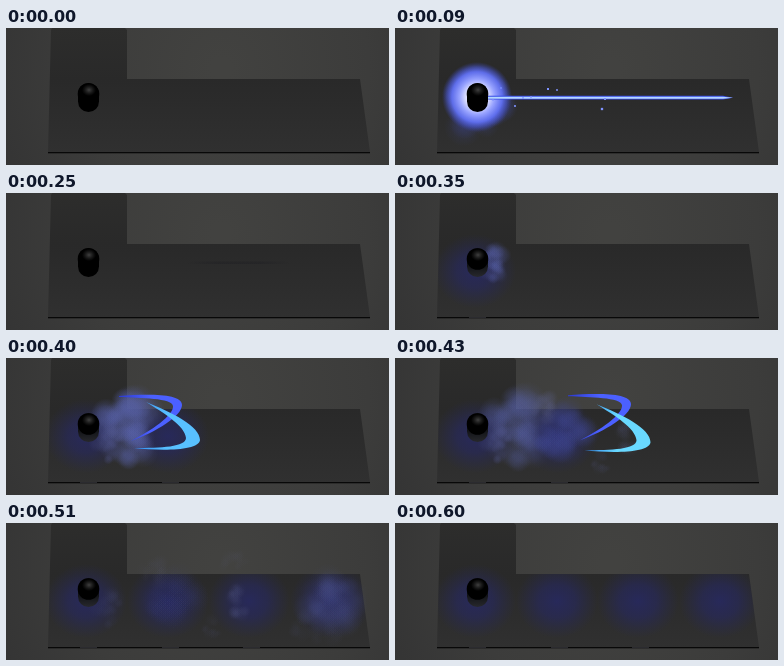
Animation, 383 px wide and 137 px high, one loop 680 ms. Source, as an HTML page with a canvas:

```html
<!DOCTYPE html>
<html lang="en">
<head>
<meta charset="utf-8">
<title>Beam and crescent attack</title>
<style>
html, body { margin: 0; width: 100%; height: 100%; overflow: hidden; background: #3c3c3b; }
canvas { display: block; width: 383px; height: 137px; }
</style>
</head>
<body>
<canvas id="stage" width="383" height="137"></canvas>
<script>
const ctx = document.getElementById('stage').getContext('2d');
const LOOP = 680;
// The picture holds between these times.
const STEPS = [0, 40, 90, 130, 160, 210, 250, 350, 400, 430, 460, 510, 550, 600];
const LIGHTS = [[80, 350], [162, 400], [243, 510], [325, 510]];
const floorShape = new Path2D('M45 2L46 0H119L121 2V51H354L364 124H42Z');
const frontCrescent = new Path2D('M140 44C165 54 194 68 194 82C193 93 155 93 128 90C155 90 180 89 180 80C179 68 158 55 140 44Z');
const backCrescent = new Path2D('M113 38C140 36 176 35 176 47C176 58 150 74 125 83C145 73 168 57 167 48C166 40 135 40 113 39Z');

// Linear interpolation through [time, value] pairs, zero outside them.
function key(t, ...pairs) {
  for (let i = 0; i < pairs.length; i++) {
    const [time, value] = pairs[i];
    if (t === time) return value;
    if (t < time) {
      if (!i) return 0;
      const [t0, v0] = pairs[i - 1];
      return v0 + (value - v0) * (t - t0) / (time - t0);
    }
  }
  return 0;
}

function random(seed) {
  return () => {
    seed = (seed * 16807) % 2147483647;
    return seed / 2147483647;
  };
}

function fade(gradient, stops) {
  stops.forEach(([at, color]) => gradient.addColorStop(at, color));
  return gradient;
}

function blob(x, y, rx, ry, stops) {
  ctx.save();
  ctx.translate(x, y);
  ctx.scale(1, ry / rx);
  ctx.fillStyle = fade(ctx.createRadialGradient(0, 0, 0, 0, 0, rx), stops);
  ctx.fillRect(-rx, -rx, rx * 2, rx * 2);
  ctx.restore();
}

function smoke(x, y, rx, ry, alpha, rgb, seed, count = 22) {
  if (alpha <= 0) return;
  const rnd = random(seed * 7919);
  rnd();
  for (let i = 0; i < count; i++) {
    const angle = rnd() * Math.PI * 2;
    const dist = Math.sqrt(rnd()) * 0.72;
    const size = Math.min(rx, ry) * (0.24 + rnd() * 0.3);
    const a = alpha * (0.5 + rnd() * 0.7);
    blob(x + Math.cos(angle) * rx * dist, y + Math.sin(angle) * ry * dist, size, size, [
      [0, `rgba(${rgb},${a})`],
      [0.5, `rgba(${rgb},${a * 0.65})`],
      [1, `rgba(${rgb},0)`]
    ]);
  }
}

function scene() {
  ctx.fillStyle = fade(ctx.createRadialGradient(215, 40, 10, 215, 40, 240), [
    [0, '#424240'], [0.6, '#3c3c3b'], [1, '#343434']
  ]);
  ctx.fillRect(0, 0, 383, 137);
  ctx.fillStyle = fade(ctx.createLinearGradient(0, 0, 0, 124), [
    [0, '#2d2d2c'], [0.42, '#292929'], [1, '#303030']
  ]);
  ctx.fill(floorShape);
  ctx.fillStyle = '#080808';
  ctx.fillRect(42, 124, 322, 1.3);
}

function floorLights(t) {
  ctx.save();
  ctx.clip(floorShape);
  for (const [x, start] of LIGHTS) {
    if (t < start) continue;
    blob(x, 78, 41, 37, [
      [0, 'rgba(38,40,108,.72)'], [0.45, 'rgba(38,40,102,.55)'], [1, 'rgba(38,40,90,0)']
    ]);
  }
  ctx.restore();
  ctx.fillStyle = '#2b2b2f';
  for (const [x, start] of LIGHTS.slice(0, 3)) {
    if (t >= start) ctx.fillRect(x - 6, 124, 17, 1);
  }
}

function capsule(lit) {
  if (lit) {
    ctx.fillStyle = fade(ctx.createLinearGradient(0, 72, 0, 85), [[0, '#111216'], [1, '#292a2e']]);
  } else {
    ctx.fillStyle = '#000';
  }
  ctx.beginPath();
  ctx.roundRect(72, 55, 21, 29, 10.5);
  ctx.fill();
  ctx.fillStyle = '#000';
  ctx.beginPath();
  ctx.arc(82.5, 66, 10.8, 0, Math.PI * 2);
  ctx.fill();
  blob(83, 62, 7, 6, [[0, 'rgba(85,85,85,.75)'], [1, 'rgba(60,60,60,0)']]);
}

function streak(x, width, height, alpha, edge, core) {
  const shape = (w, h, color) => {
    ctx.fillStyle = color;
    ctx.beginPath();
    ctx.ellipse(x, 69.7, w / 2, h / 2, 0, 0, Math.PI * 2);
    ctx.fill();
  };
  ctx.globalAlpha = alpha;
  shape(width, height, edge);
  shape(width * 0.8, height * 0.45, core);
  ctx.globalAlpha = 1;
}

function beam(t) {
  const trail = key(t, [130, 0.3], [160, 0.5], [210, 0.35], [250, 0.14]);
  if (trail) {
    const inset = Math.max(0, t - 160) * 0.55;
    ctx.fillStyle = fade(ctx.createLinearGradient(130 + inset, 0, 335 - inset, 0), [
      [0, 'rgba(5,5,18,0)'], [0.3, `rgba(5,5,18,${trail})`],
      [0.7, `rgba(5,5,18,${trail})`], [1, 'rgba(5,5,18,0)']
    ]);
    ctx.fillRect(130, 68.5, 206, 2.5);
  }
  const solid = key(t, [40, 1], [90, 1], [130, 0.65]);
  if (solid) {
    const half = key(t, [40, 2.4], [90, 1.9], [130, 1.2]);
    const taper = (h, color) => {
      ctx.fillStyle = color;
      ctx.beginPath();
      ctx.moveTo(88, 69.7 - h);
      ctx.lineTo(328, 69.7 - h);
      ctx.lineTo(338, 69.7);
      ctx.lineTo(328, 69.7 + h);
      ctx.lineTo(88, 69.7 + h);
      ctx.fill();
    };
    ctx.globalAlpha = solid;
    taper(half, '#3549e8');
    taper(half * 0.5, '#b4d6ff');
    ctx.globalAlpha = 1;
  }
  const broken = key(t, [130, 0.5], [160, 1], [210, 0.2]);
  if (broken) {
    const shrink = t > 160 ? 0.6 : 1;
    for (const [x, w] of [[150, 17], [187, 36], [241, 31], [284, 25], [320, 29]]) {
      streak(x, w * shrink, 3.4 * shrink, broken, '#3348e0', '#8ba6ff');
    }
  }
}

function sparks(t) {
  const alpha = key(t, [40, 1], [90, 1], [160, 0.85], [210, 0.3]);
  if (!alpha) return;
  const u = (t - 90) / 70;
  const list = [
    [106, 60, 10, 6, 1.5], [98, 72, 0, 1, 1.5], [120, 78, 1, 0, 1.8], [128, 70, 5, 0, 1.6],
    [136, 69, 1, 0, 1.6], [153, 61, 9, 0, 2], [162, 62, 0, 0, 1.7],
    [210, 71, 16, 1, 2], [207, 81, 24, 1, 2.3]
  ];
  ctx.globalAlpha = alpha;
  ctx.fillStyle = t < 130 ? '#7f93ff' : '#5468e6';
  for (const [x, y, dx, dy, size] of list) {
    ctx.fillRect(x + dx * u - size / 2, y + dy * u - size / 2, size, size);
  }
  ctx.globalAlpha = 1;
}

function blast(t) {
  const spread = key(t, [40, 30], [90, 40], [160, 42], [210, 44]);
  const dense = key(t, [40, 0.25], [90, 0.32], [160, 0.4], [210, 0.12]);
  smoke(79, 76 + t / 60, spread, spread * 0.93, dense, t < 130 ? '62,72,160' : '84,96,176', 5, 32);
  const glow = key(t, [40, 1], [90, 1], [130, 0.5], [160, 0.06]);
  if (!glow) return;
  ctx.globalAlpha = glow;
  blob(82, 69, 35, 35, [
    [0, '#e8e9ff'], [0.32, '#dcdeff'], [0.5, '#98a3ff'], [0.72, 'rgba(98,114,246,.92)'],
    [0.86, 'rgba(76,90,215,.55)'], [1, 'rgba(60,70,180,0)']
  ]);
  ctx.globalAlpha = 1;
}

function trailSmoke(t) {
  const near = key(t, [350, 0.25], [400, 0.42], [430, 0.25], [460, 0.1], [510, 0.03]);
  const wide = key(t, [350, 18], [400, 36], [460, 40], [510, 42]);
  smoke(key(t, [350, 98], [400, 122], [510, 124]), 70, wide, wide * 1.2,
    t <= 430 ? near : 0, '88,98,172', 11, 32);
  smoke(102, 86, 17, 24, key(t, [400, 0.3], [430, 0.28], [460, 0.22], [510, 0.08]), '82,88,145', 3, 14);
  smoke(165, 72, 35, 34, key(t, [430, 0.28], [460, 0.13], [510, 0.05]), '64,72,150', 17, 24);
  smoke(150, 49, 18, 18, key(t, [430, 0.2], [460, 0.16], [510, 0.05]), '92,96,140', 8, 12);
  smoke(206, 105, 13, 15, key(t, [430, 0.1], [460, 0.14], [510, 0.06]), '78,82,125', 13, 10);
  smoke(232, 78, 17, 23, key(t, [430, 0.1], [460, 0.2], [510, 0.12]), '90,96,145', 21, 14);
  smoke(228, 40, 17, 15, key(t, [460, 0.12], [510, 0.06]), '88,92,125', 9, 10);
  smoke(325, 76, 36, 36, key(t, [510, 0.16]), '78,86,150', 23, 22);
  smoke(316, 103, 50, 19, key(t, [510, 0.1], [550, 0.06]), '78,84,130', 29, 14);
}

function crescents(t) {
  if (t < 400 || t > 460) return;
  const u = (t - 400) / 60;
  const draw = (shape, dx, dy, left, right, from, to) => {
    ctx.save();
    ctx.translate(dx * u, dy * u);
    ctx.fillStyle = fade(ctx.createLinearGradient(left, 0, right, 0), [[0, from], [0.5, to], [1, to]]);
    ctx.fill(shape);
    ctx.restore();
  };
  draw(backCrescent, 120, -1.5, 113, 176, '#2c3ad0', '#4b60ff');
  const bright = `rgb(${88 + 34 * u},${192 + 50 * u},255)`;
  draw(frontCrescent, 123, 4.5, 128, 194, '#2f8cf4', bright);
}

function draw(t) {
  scene();
  floorLights(t);
  blast(t);
  beam(t);
  sparks(t);
  trailSmoke(t);
  capsule(t >= 350);
  crescents(t);
}

let shown = -1;
function tick() {
  const now = performance.now() % LOOP;
  const step = STEPS.filter(s => s <= now).pop();
  if (step !== shown) draw(shown = step);
  requestAnimationFrame(tick);
}
tick();
</script>
</body>
</html>
```
